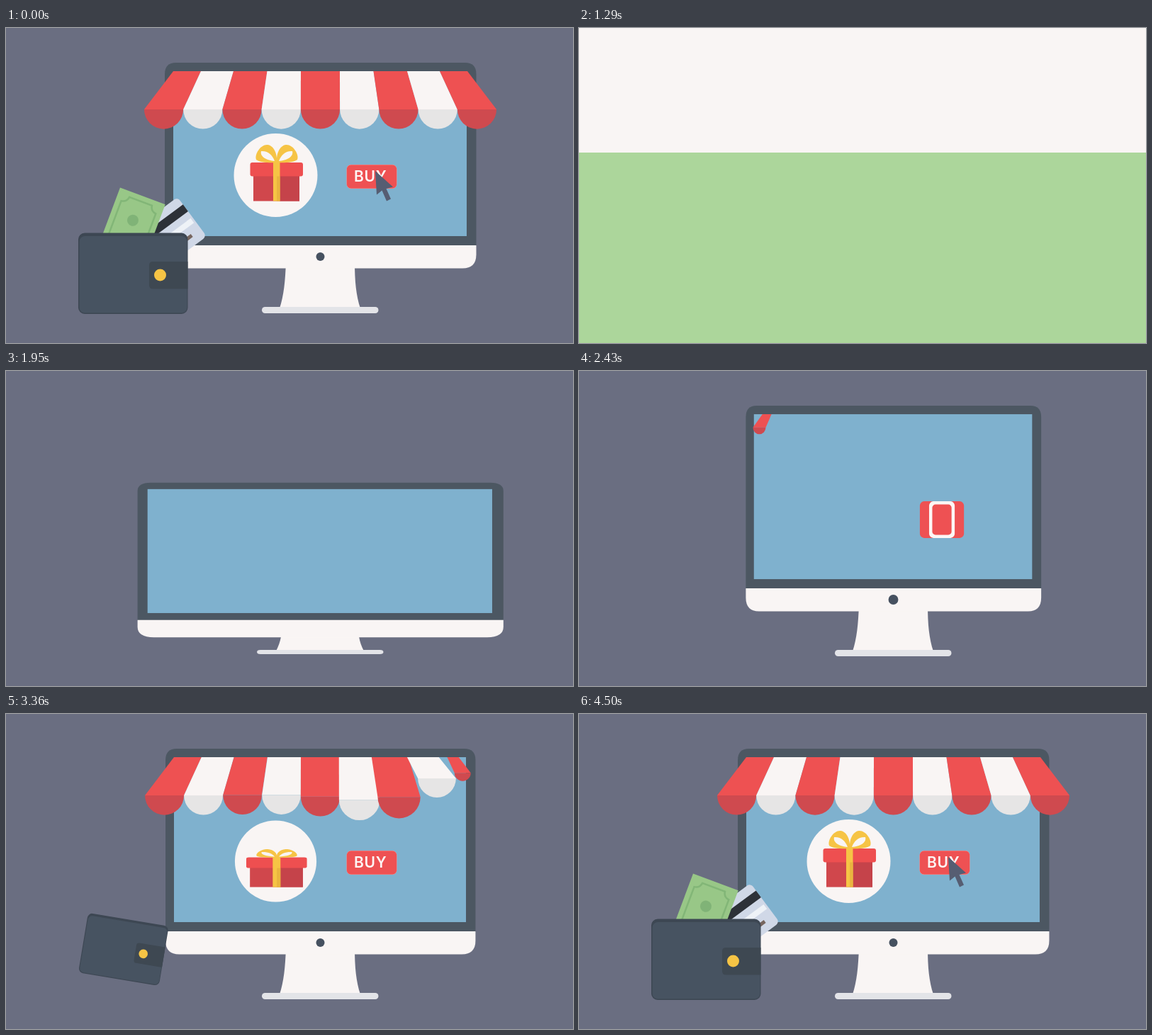
Write an HTML page that moves like this. It is 800 px wide and 445 px high and loops after 4530 ms.

```html
<!DOCTYPE html>
<html lang="en">
<head>
<meta charset="utf-8">
<title>Online shop</title>
<style>
html, body { margin: 0; width: 100%; height: 100%; overflow: hidden; background: #6a6e81; }
svg { display: block; width: 100vw; height: 100vh; }
text { font: 600 21px Inter, "Open Sans", sans-serif; letter-spacing: .7px; fill: #fdf6f5; }
</style>
</head>
<body>
<svg viewBox="0 0 800 445">
  <rect width="800" height="445" fill="#6a6e81"/>
  <g id="stand">
    <path d="M395 330H492C492 358 494 378 500 396H386C392 378 394 358 395 330Z" fill="#f9f5f4"/>
    <rect x="361" y="394" width="164.500" height="9" rx="4.500" fill="#e3e4e8"/>
  </g>
  <g id="body">
    <path d="M224 308V65Q224 49 240 49H647.500Q663.500 49 663.500 65V308Z" fill="#4c5762"/>
    <path d="M224 307H663.500V320Q663.500 339.500 644 339.500H243.500Q224 339.500 224 320Z" fill="#f9f5f4"/>
    <rect x="236" y="61" width="414" height="233" fill="#7fb1ce"/>
  </g>
  <circle id="dot" cx="443.500" cy="323" fill="#465160"/>
  <circle id="disc" cx="380.500" cy="208" fill="#f9f5f4"/>
  <g id="box">
    <path d="M349 207H414V244.500H349Z" fill="#d0474c"/>
    <path d="M386 207H414V244.500H386Z" fill="#c5434a"/>
    <rect x="344.500" y="190" width="74.500" height="19.500" rx="3" fill="#ee4f50"/>
    <path d="M377 189H386.500V244.500H377Z" fill="#f6c445"/>
    <path d="M382 209.500H386.500V244.500H382Z" fill="#e9b53f"/>
  </g>
  <g id="bow">
    <g id="loop">
      <path d="M382 190C372 191 358 190 353 186C350 178 360 164 369 165C378 166 383 178 382 190Z" fill="#f6c445"/>
      <path d="M379 188C376 179 369 173 360 174C358 182 368 187 379 188Z" fill="#f9f5f4"/>
    </g>
    <use href="#loop" transform="translate(764 0) scale(-1 1)"/>
  </g>
  <g id="button">
    <rect id="back" fill="#ee5153"/>
    <rect id="rim" fill="#fdf6f5"/>
    <rect id="front" fill="#ee5153"/>
    <g id="label"><text x="491" y="216.700">BUY</text></g>
  </g>
  <g id="awning"></g>
  <g id="card">
    <g transform="translate(242 239) rotate(-36.500)">
      <rect x="-60" width="60" height="69" rx="6" fill="#d0d8e7"/>
      <rect x="-60" y="13" width="60" height="12" fill="#2d3138"/>
      <rect x="-60" y="35" width="57" height="8" fill="#eef2f7"/>
      <rect x="-25" y="53" width="9" height="5" fill="#77665f"/>
    </g>
  </g>
  <g id="bill">
    <g transform="translate(161 225.500) rotate(20.500)">
      <rect width="68" height="82" fill="#98c787"/>
      <path d="M17 8H51Q52 16 60 17V80H8V17Q16 16 17 8Z" fill="none" stroke="#82b677" stroke-width="2.500"/>
      <circle cx="33" cy="37" r="8" fill="#80b377"/>
    </g>
  </g>
  <g id="wallet">
    <rect x="102" y="289.500" width="154.500" height="114.500" rx="9" fill="#3d4753"/>
    <rect x="103.500" y="294" width="152" height="108.500" rx="8" fill="#475361"/>
    <path d="M256.500 330H207Q202 330 202 335V363Q202 368.500 207 368.500H256.500Z" fill="#3e4852"/>
    <circle cx="217.500" cy="349" r="8.500" fill="#f6c445"/>
  </g>
  <g id="cursor">
    <path d="M521 202L546 224.500L536.500 227L543 241.500L537 244.500L530.500 229.500L523 235.500Z" fill="#565d72"/>
  </g>
  <g id="wipes"></g>
</svg>
<script>
const LOOP = 4530, REBUILD = 1600;
const NS = 'http://www.w3.org/2000/svg';
const $ = id => document.getElementById(id);

function add(parent, tag, attrs) {
  const el = document.createElementNS(NS, tag);
  set(el, attrs);
  return parent.appendChild(el);
}
function set(el, attrs) {
  for (const k in attrs) el.setAttribute(k, attrs[k]);
}

const part = (t, from, to) => Math.min(1, Math.max(0, (t - from) / (to - from)));
const smooth = p => p * p * (3 - 2 * p);
const inOut = p => p < .5 ? 2 * p * p : 1 - 2 * (1 - p) ** 2;
const swing = (x, period, decay) => Math.exp(-x / decay) * Math.cos(2 * Math.PI * x / period);

// Grows from 0, overshoots 1 and settles.
const pop = (t, start, period = 480, decay = 120) =>
  t <= start ? 0 : 1 - swing(t - start, period, decay);

// Builds up to 1 at the peak, then swings out to 0.
const wobble = (t, peak, period, decay) =>
  t < peak ? smooth(part(t, peak - 120, peak)) : swing(t - peak, period, decay);

// Scale and turn about (x, y), then shift.
function pose(id, x, y, sx = 1, sy = sx, dx = 0, dy = 0, turn = 0) {
  $(id).setAttribute('transform',
    `translate(${x + dx} ${y + dy}) rotate(${turn}) scale(${sx} ${sy}) translate(${-x} ${-y})`);
}

const half = [27.5, 75, 122.5, 168.5, 207.5];
const tops = [...half.map(d => 443.5 - d).reverse(), ...half.map(d => 443.5 + d)];
const stripes = tops.slice(1).map((_, i) => ({
  cloth: add($('awning'), 'path', { fill: i % 2 ? '#f9f5f4' : '#ee5152' }),
  hem: add($('awning'), 'path', { fill: i % 2 ? '#e6e5e5' : '#cf4a4f' })
}));

function drawStripe(i, t) {
  const x = t - 2385 - i * 115;
  const w = pop(x, 0, 720, 135);
  const h = w * (1 - .46 * wobble(x, 163, 600, 135));
  const { cloth, hem } = stripes[i];
  const a = tops[i], b = tops[i + 1], c = (a + b) / 2;
  const at = v => c + (v - c) * w;
  const edge = k => at(443.5 + (k - 4.5) * 55.25);
  const l = edge(i), r = edge(i + 1), y = 61 + 54 * h, rad = (r - l) / 2;
  set(cloth, { d: `M${at(a)} 61H${at(b)}L${r} ${y}H${l}Z` });
  set(hem, { d: `M${l} ${y}H${r}A${rad} ${rad} 0 0 1 ${l} ${y}Z` });
}

function drawMonitor(t) {
  const drop = -420 * (1 - part(t, 1640, 1840) ** 2);
  const wide = wobble(t, 1950, 960, 395), flat = wobble(t, 1950, 640, 163);
  const sx = 1 + .175 * wide;
  pose('body', 444, 339, sx, 1 - .25 * flat, 0, drop + 37 * flat);
  pose('awning', 444, 61, sx, 1);
  pose('stand', 443, 403, 1 + .085 * flat, 1 - .32 * flat, 0, drop - 3 * flat);
  set($('dot'), { r: 6 * pop(t, 2210) });
}

function drawPlate(id, cx, w, h) {
  set($(id), { x: cx - w / 2, y: 210 - h / 2, width: w, height: h, rx: Math.min(6, w / 6) });
}

function drawButton(t, clock) {
  const tall = wobble(t, 2430, 480, 110), cx = 516 - 4 * tall;
  const gap = 9 * Math.max(0, tall);
  const size = start => {
    const w = pop(t, start, 720, 135);
    return [70.5 * w, 33.5 * (1 + .55 * tall) * Math.min(1, 2.5 * w)];
  };
  const [w, h] = size(2361);
  drawPlate('back', cx, ...size(2290));
  drawPlate('rim', cx, w, h);
  drawPlate('front', cx, Math.max(0, w - gap), Math.max(0, h - gap));
  pose('label', 516, 210, pop(t, 2600));
  const press = smooth(1 - part(Math.abs(clock - 570), 0, 120));
  pose('button', 516, 209.5, 1 - .09 * press);
}

function drawGift(t) {
  set($('disc'), { r: 59 * pop(t, 2900, 440, 125) });
  const grow = smooth(part(t, 3170, 3300)), q = wobble(t, 3360, 360, 110);
  const sy = grow * (1 - .23 * q);
  pose('box', 381.5, 245, grow * (1 + .15 * q), sy);
  const open = smooth(part(t, 3260, 3350));
  pose('bow', 382, 190, open * (1 - .03 * q), open * (1 - .54 * q), 0, 55 * (1 - sy));
}

function drawWallet(t) {
  const q = wobble(t, 3360, 400, 140);
  const s = pop(t, 3279, 480, 130);
  pose('wallet', 179, 347, s, s, -13.5 * q, -14.5 * q, 9.5 * q);
  rise('bill', t, 3780, -25, 71);
  rise('card', t, 3890, -35, 75);
}

// Slides up out of the wallet.
function rise(id, t, start, dx, dy) {
  const rest = 1 - pop(t, start, 480, 105);
  pose(id, 0, 0, 1, 1, dx * rest, dy * rest);
  $(id).style.display = t > start ? '' : 'none';
}

function drawCursor(t) {
  const away = 1 - smooth(part(t, 4030, 4340));
  pose('cursor', 521, 202, part(t, 4030, 4130), undefined, 90 * away, 120 * away);
}

const wipes = [['#f9f5f4', 875], ['#acd69b', 1124.4], ['#6a6e81', 1290]].map(([fill, start]) => ({
  start, el: add($('wipes'), 'rect', { width: 800, height: 446, fill })
}));

function drawWipes(t) {
  for (const { start, el } of wipes) {
    const p = part(t, start, start + 300);
    set(el, { y: 445 * (1 - inOut(p)) });
    el.style.display = p > 0 && t < REBUILD ? '' : 'none';
  }
}

function draw(t) {
  // The shop stays complete until the wipes have covered it.
  const u = t < REBUILD ? LOOP : t;
  drawMonitor(u);
  drawButton(u, t);
  drawGift(u);
  stripes.forEach((_, i) => drawStripe(i, u));
  drawWallet(u);
  drawCursor(u);
  drawWipes(t);
}

const begin = performance.now();
function frame() {
  draw((performance.now() - begin) % LOOP);
  requestAnimationFrame(frame);
}
frame();
</script>
</body>
</html>
```
